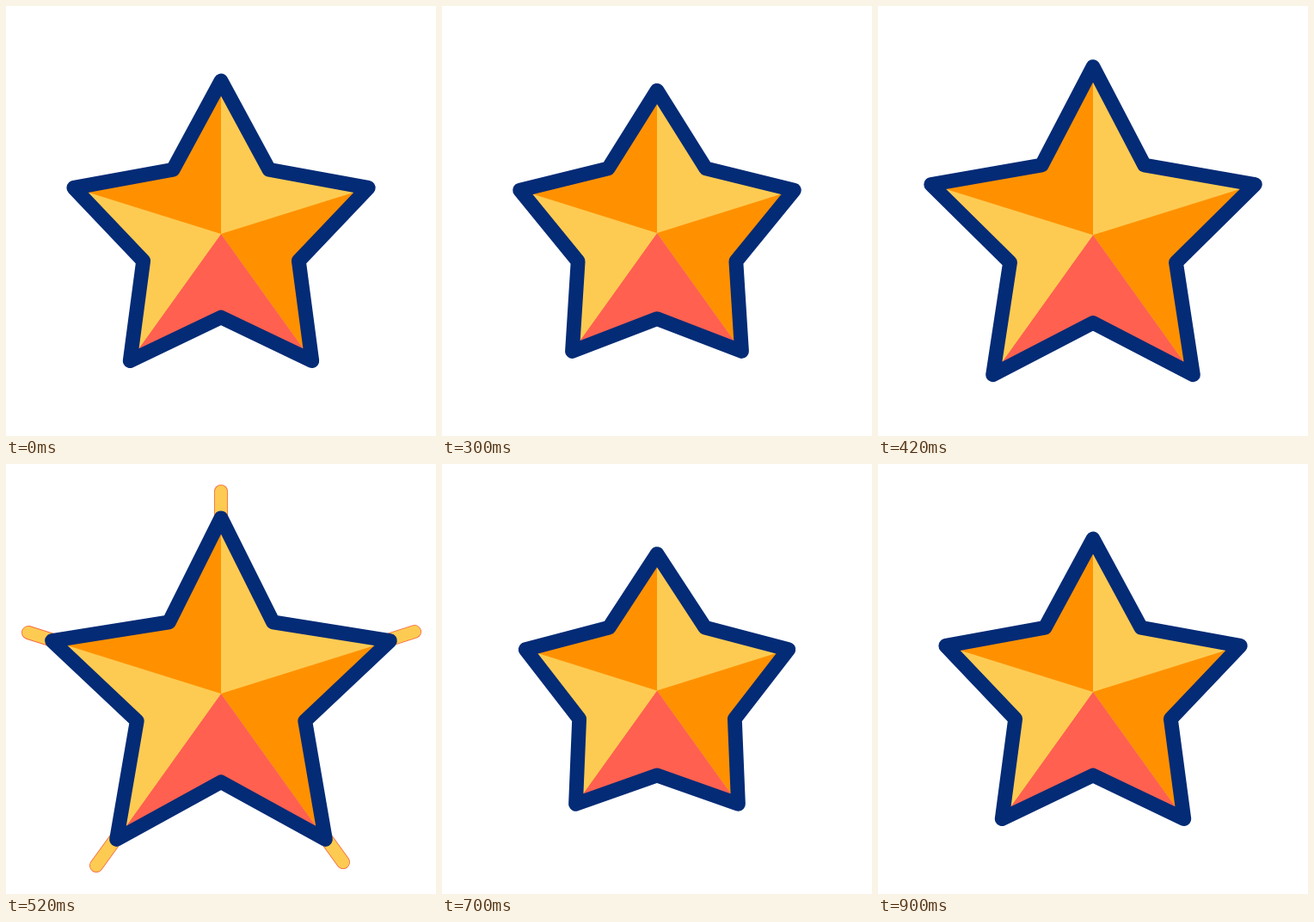
Animation of 500x500 px, one loop 1000 ms. Source, as an HTML page:

```html
<!DOCTYPE html>
<html lang="en">
<head>
<meta charset="utf-8">
<title>Star</title>
<style>
  html, body { margin: 0; width: 100%; height: 100%; overflow: hidden; background: #fff; }
  svg { display: block; width: 100%; height: 100%; }
</style>
</head>
<body>
<svg viewBox="0 0 500 500">
  <g id="sparks" stroke-linecap="round"></g>
  <path id="body" fill="#fecb52"/>
  <g id="facets"></g>
  <path id="outline" fill="none" stroke="#042b76" stroke-width="16.8" stroke-linejoin="round"/>
</svg>
<script>
const LOOP = 1000, STEP = 20, POINTS = 5, CX = 250, CY = 267;
const YELLOW = '#fecb52', ORANGE = '#ff9100', RED = '#ff6050';
const SPARK_ENDS = [[250, 32], [475, 195], [392, 463], [105, 467], [26, 196]];

const $ = id => document.getElementById(id);
const add = (parent, attrs) => {
  const el = document.createElementNS('http://www.w3.org/2000/svg', 'path');
  for (const k in attrs) el.setAttribute(k, attrs[k]);
  return $(parent).appendChild(el);
};

const facets = [YELLOW, ORANGE, RED, YELLOW, ORANGE].map(fill => add('facets', { fill }));
const sparks = SPARK_ENDS.map(() => [
  add('sparks', { stroke: '#f5683f', 'stroke-width': 16 }),
  add('sparks', { stroke: YELLOW, 'stroke-width': 14.4 })
]);

// Eased progress from 0 to 1 between two times
function ramp(t, from, to) {
  const p = Math.min(1, Math.max(0, (t - from) / (to - from)));
  return p * p * (3 - 2 * p);
}

// Corners of a regular pentagon, clockwise; turn 0 puts the first one on top
function ring(radius, cy, turn) {
  return Array.from({ length: POINTS }, (_, i) => {
    const angle = (i + turn) * 2 * Math.PI / POINTS;
    return [CX + radius * Math.sin(angle), cy - radius * Math.cos(angle)];
  });
}

const line = points => 'M' + points.map(p => p.map(v => v.toFixed(2)).join(' ')).join('L');

function drawStar(t) {
  const grow = ramp(t, 220, 500), shrink = ramp(t, 500, 692);
  const stretch = -20 * ramp(t, 100, 220) + 45 * grow - 42.3 * shrink + 17.3 * ramp(t, 692, 880);
  const tips = ring(180 + 1.12 * stretch, CY + 0.1 * stretch, 0);
  const notches = ring(95 + 8 * (grow - shrink), CY, 0.5);
  const hub = [CX, CY - 2 + 0.08 * stretch];

  facets.forEach((f, i) =>
    f.setAttribute('d', line([hub, tips[i], notches[i], tips[(i + 1) % POINTS]]) + 'Z'));
  const edge = line(tips.flatMap((tip, i) => [tip, notches[i]])) + 'Z';
  $('body').setAttribute('d', edge);
  $('outline').setAttribute('d', edge);
}

// Each spark shoots out from behind the star, then its tail catches up with its head
function drawSparks(t) {
  const visible = t > 380 && t < 660;
  $('sparks').setAttribute('visibility', visible ? 'visible' : 'hidden');
  const head = 0.4 + 0.6 * ramp(t, 380, 500);
  const tail = 0.4 + 0.5999 * ramp(t, 500, 620);
  SPARK_ENDS.forEach(([x, y], i) => {
    const along = k => [CX + (x - CX) * k, CY + (y - CY) * k];
    sparks[i].forEach(s => s.setAttribute('d', line([along(tail), along(head)])));
  });
}

const start = performance.now();
function tick() {
  const time = (performance.now() - start) % LOOP;
  const t = Math.floor(time / STEP) * STEP;
  drawStar(t);
  drawSparks(t);
  requestAnimationFrame(tick);
}
tick();
</script>
</body>
</html>
```
